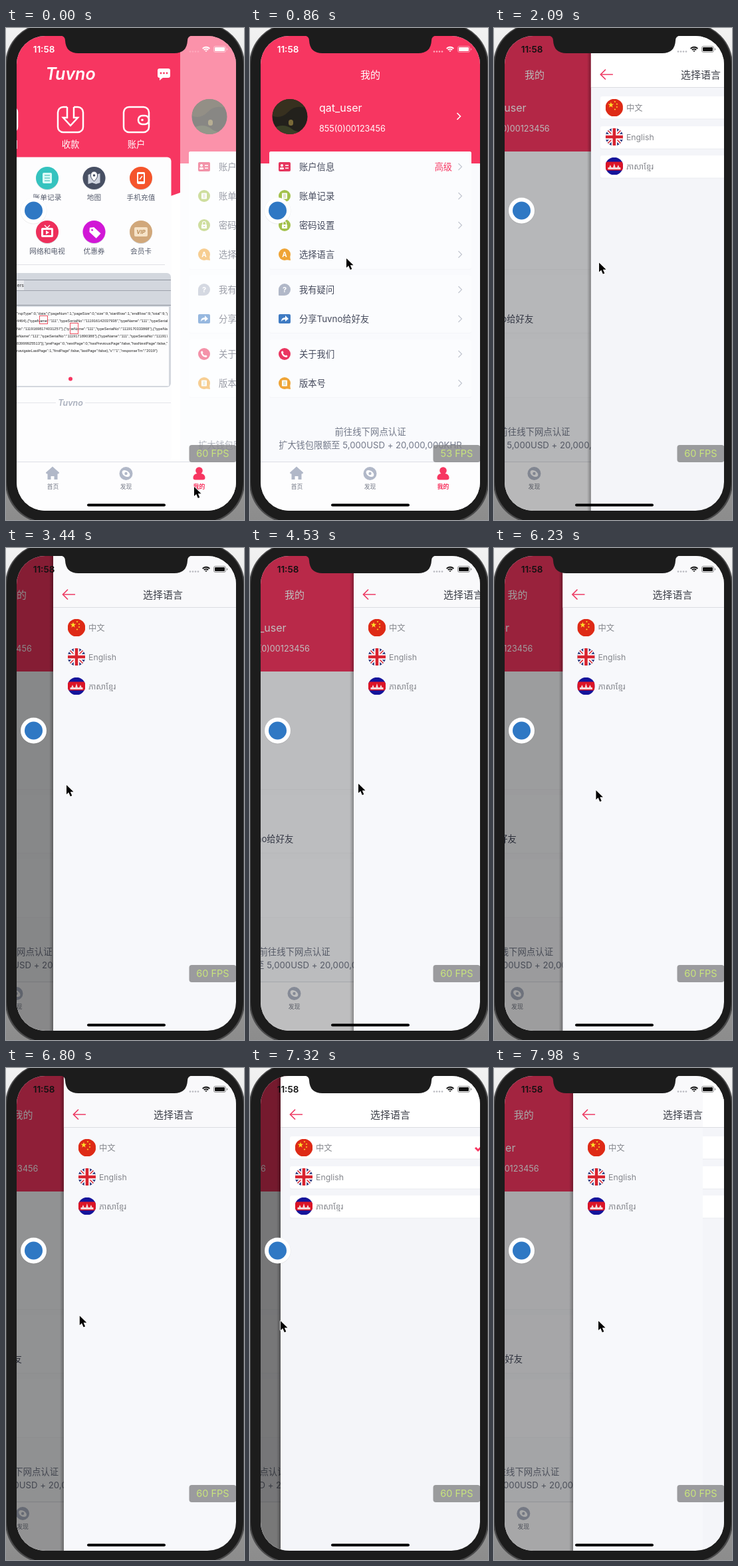
Animation, 358 px wide and 741 px high, one loop 8000 ms. Source, as an HTML page with a canvas:

```html
<!DOCTYPE html>
<html lang="zh-CN">
<head>
<meta charset="utf-8">
<title>Swipe back</title>
<style>
html, body { margin: 0; width: 100%; height: 100%; overflow: hidden; background: #d4d4d4; }
canvas { display: block; width: 358px; height: 741px; }
</style>
</head>
<body>
<canvas id="stage"></canvas>
<script>
const LOOP = 8000, W = 330, LEFT = 16, TOP = 12;
const RED = '#f73661', INK = '#454a5c', GREY = '#b1b8c8';
const FONT = 'Inter, "Noto Sans CJK SC", "Noto Sans CJK", "Noto Sans", sans-serif';
const cv = document.getElementById('stage');
const c = cv.getContext('2d');
const dpr = window.devicePixelRatio || 1;
cv.width = 358 * dpr;
cv.height = 741 * dpr;

// [time, value] pairs
const PAGE = [[1290, 330], [1540, 0], [1710, 0], [2080, 130], [2510, 40], [2900, 150], [3290, 34],
  [3350, 34], [3700, 170], [4180, 90], [4530, 140], [4770, 140], [5150, 50], [5600, 150],
  [5980, 30], [6520, 160], [6780, 70], [7030, 130], [7320, 30], [7400, 30], [8400, 147]];
const LEAD = [[1540, 9], [3440, 20], [4530, 7], [4770, 7], [6230, 50], [7320, 0], [7400, 0], [7980, 38]];
const CURSOR_X = [[90, 283], [530, 215], [710, 200], [860, 145], [1150, 118], [1300, 118], [1530, 25]];
const CURSOR_Y = [[90, 691], [530, 520], [710, 470], [860, 347], [1150, 341], [1300, 341], [1530, 352],
  [3440, 357], [4530, 355], [6230, 365], [7320, 381]];

const smooth = u => (1 - Math.cos(Math.PI * u)) / 2;
const easeOut = u => 1 - (1 - u) ** 3;
const clamp = u => Math.max(0, Math.min(1, u));

function track(keys, t, ease = u => u) {
  if (t <= keys[0][0]) return keys[0][1];
  for (let i = 1; i < keys.length; i++) {
    const [a, v] = keys[i - 1], [b, w] = keys[i];
    if (t <= b) return v + (w - v) * ease((t - a) / (b - a));
  }
  return keys[keys.length - 1][1];
}

function rect(x, y, w, h, fill, r = 0) {
  c.beginPath();
  c.roundRect(x, y, w, h, r);
  c.fillStyle = fill;
  c.fill();
}
function disc(x, y, r, fill) {
  c.beginPath();
  c.arc(x, y, r, 0, 7);
  c.fillStyle = fill;
  c.fill();
}
function line(points, color, width = 1) {
  c.beginPath();
  points.forEach(([x, y]) => c.lineTo(x, y));
  c.strokeStyle = color;
  c.lineWidth = width;
  c.stroke();
}
function poly(points, fill) {
  c.beginPath();
  points.forEach(([x, y]) => c.lineTo(x, y));
  c.fillStyle = fill;
  c.fill();
}
function shape(d, fill, stroke, width = 1) {
  const p = new Path2D(d);
  if (fill) { c.fillStyle = fill; c.fill(p); }
  if (stroke) { c.strokeStyle = stroke; c.lineWidth = width; c.stroke(p); }
}
function text(s, x, y, size, color, align = 'left', style = '', font = FONT) {
  c.font = `${style} ${size}px ${font}`;
  c.textAlign = align;
  c.fillStyle = color;
  c.fillText(s, x, y + size * .37);
}
function at(x, y, draw) {
  c.save();
  c.translate(x, y);
  draw();
  c.restore();
}
function clipTo(x, y, w, h, draw, r = 0) {
  c.save();
  c.beginPath();
  c.roundRect(x, y, w, h, r);
  c.clip();
  draw();
  c.restore();
}
const chevron = (x, y, color, width = 1.2, s = 5) =>
  line([[x - s / 2, y - s], [x + s / 2, y], [x - s / 2, y + s]], color, width);

function bubble(color) {
  disc(0, 0, 9, color);
  poly([[2, 8], [9, 9], [8, 2]], color);
}
function doc() {
  rect(-4, -4.5, 8, 9, '#fff', 1);
  for (const y of [-2, 0, 2]) line([[-2, y], [2, y]], '#a8b060', .7);
}
const ICONS = {
  card() {
    rect(-9, -7, 18, 14, '#e6375f', 2);
    disc(-4, -2, 2, '#fff');
    rect(-7, 1, 6, 3, '#fff', 1.5);
    line([[1, -2], [6, -2]], '#fff', 1.3);
    line([[1, 2], [6, 2]], '#fff', 1.3);
  },
  bill() { disc(0, 0, 9, '#a3c14b'); doc(); },
  lock() {
    disc(0, 0, 9, '#a3c14b');
    rect(-4, -1, 8, 6, '#fff', 1);
    shape('M-2.5-1V-3A2.5 2.5 0 0 1 2.5-3V-1', null, '#fff', 1.2);
    disc(0, 2, 1, '#a3c14b');
  },
  lang() { bubble('#efa436'); text('A', 0, 0, 10, '#fff', 'center', 'bold'); },
  help() {
    disc(0, 0, 9, GREY);
    rect(-9, 0, 9, 9, GREY, 1);
    text('?', 0, 0, 11, '#fff', 'center', 'bold');
  },
  share() {
    rect(-9, -7, 18, 14, '#3f7bc3', 2);
    shape('M-5 4Q-5-2 1-2V-5L6 0L1 4V1Q-3 1-5 4Z', '#fff');
  },
  phone() {
    disc(0, 0, 9, '#ea3560');
    shape('M-4-3Q-3 3 3 4', null, '#fff', 2.2);
    line([[-4, -4], [-2.5, -1.5]], '#fff', 2.6);
    line([[1.5, 2.5], [4, 4]], '#fff', 2.6);
  },
  version() { bubble('#efa436'); doc(); }
};
const ROWS = [['card', '账户信息', 209], ['bill', '账单记录', 253], ['lock', '密码设置', 297],
  ['lang', '选择语言', 341], ['help', '我有疑问', 394], ['share', '分享Tuvno给好友', 438],
  ['phone', '关于我们', 491], ['version', '版本号', 535]];

function avatar() {
  clipTo(33.5, 107, 53, 53, () => {
    rect(33, 107, 54, 54, '#23211c');
    shape('M33 107H87V122Q70 114 58 126T33 132Z', '#37301f');
    shape('M33 161V152Q50 142 63 152T87 149V161Z', '#3a3f26');
    rect(58, 138, 7, 9, '#7a6a38', 4);
  }, 27);
}

function mine() {
  rect(LEFT, TOP, W, 715, '#f9fafd');
  rect(LEFT, TOP, W, 192, RED);
  text('我的', 181, 70, 15, '#fff', 'center');
  avatar();
  text('qat_user', 104, 120, 16, '#fff');
  text('855(0)00123456', 104, 151, 12.6, '#fff');
  chevron(314, 133, '#fff', 1.6);
  for (const [y, h] of [[186, 177], [372, 87], [469, 87]]) {
    rect(29, y, 304, h + 1, '#f4f5f8', 3);
    rect(29, y, 304, h, '#fbfcfe', 3);
  }
  for (const [icon, label, y] of ROWS) {
    at(52, y, ICONS[icon]);
    text(label, 74, y, 13.3, INK);
    chevron(316, y, '#c3c7d0');
  }
  text('高级', 304, 209, 13.2, RED, 'right');
  text('前往线下网点认证', 181, 608, 13.4, '#737989', 'center');
  text('扩大钱包限额至 5,000USD + 20,000,000KHR', 181, 628, 13.2, '#737989', 'center');
}

function tabBar() {
  rect(LEFT, 654, W, 73, '#fdfdfe');
  line([[LEFT, 653.5], [346, 653.5]], '#dcdee5');
  shape('M70 660.5L80 669.5Q80 672 77.5 671.5V680H72.5V675H67.5V680H62.5V671.5Q60 672 60 669.5Z', GREY);
  disc(180.5, 671, 10, GREY);
  c.beginPath();
  c.ellipse(180.5, 671, 6.5, 4.3, .6, 0, 7);
  c.fillStyle = '#fff';
  c.fill();
  disc(180.5, 671, 2.2, GREY);
  disc(290.5, 666.5, 5.3, RED);
  rect(281.5, 671, 18, 9.5, RED, [8, 8, 4, 4]);
  [['首页', 70.5], ['发现', 180.5], ['我的', 290.5]].forEach(([s, x], i) =>
    text(s, x, 691, 8.9, i == 2 ? RED : '#777c89', 'center', i == 2 ? '600' : ''));
}

function bigIcon(x, label, draw) {
  c.beginPath();
  c.roundRect(x - 19, 119, 38, 38, 8);
  c.strokeStyle = '#fff';
  c.lineWidth = 2.5;
  c.stroke();
  at(x, 138, draw);
  text(label, x, 175, 13.3, '#fff', 'center');
}
const GRID = [
  ['账单记录', '#35c3bf', () => { rect(-7, -8, 14, 16, '#d9fbf7', 2); for (const y of [-4, 0, 4]) line([[-4, y], [4, y]], '#35b3b0'); }],
  ['地图', '#474f63', () => { poly([[-9, -5], [-3, -7], [3, -5], [9, -7], [9, 7], [3, 9], [-3, 7], [-9, 9]], '#cfd4df'); shape('M0 5Q-6-1-5-5A5 5 0 0 1 5-5Q6-1 0 5Z', '#fff', '#474f63'); disc(0, -4, 1.8, '#474f63'); }],
  ['手机充值', '#f5552c', () => { rect(-6, -9, 12, 18, '#fff', 2); rect(-4, -6, 8, 11, '#f5552c'); line([[-2, 2], [2, -3]], '#fff', 1.5); }],
  ['网络和电视', '#ee2f5b', () => { rect(-9, -6, 18, 14, '#fff', 2); rect(-6, -3, 12, 8, '#ee2f5b'); poly([[-2, -2], [3, 1], [-2, 4]], '#fff'); line([[-4, -10], [0, -6], [4, -10]], '#fff', 1.3); }],
  ['优惠券', '#d117d6', () => { c.rotate(.75); poly([[-9, 0], [-5, -5], [9, -5], [9, 5], [-5, 5]], '#fff'); disc(-4, 0, 1.5, '#d117d6'); }],
  ['会员卡', '#d1a87b', () => { rect(-10, -7, 20, 14, '#f6e3c8', 2); text('VIP', 0, 0, 8, '#b88a55', 'center', 'bold italic'); }]
];
const LOG = ['"rspType":0,"data":{"pageNum":1,"pageSize":0,"size":9,"startRow":1,"endRow":9,"total":9,"pages":1,',
  '4464},{"typeName":"111","typeSerialNo":"111916142037938","typeName":"111","typeSerialNo":"1119',
  'No":"11191698174031257"},{"typeName":"111","typeSerialNo":"1119170333868"},{"typeName":"11',
  'eName":"111","typeSerialNo":"1119171890388"},{"typeName":"111","typeSerialNo":"111917192',
  '83999925513"}],"prePage":0,"nextPage":0,"hasPreviousPage":false,"hasNextPage":false,"navig',
  'navigateLastPage":1,"firstPage":false,"lastPage":false},"v":"1","responseTm":"2019"}'];

function home() {
  rect(LEFT, TOP, W, 715, '#fff');
  shape('M16 12H346V248Q181 310 16 248Z', RED);
  text('Tuvno', 181, 69, 25, '#fff', 'center', 'italic 600');
  rect(312, 61, 19, 14, '#fff', 3);
  poly([[315, 73], [315, 79], [321, 74]], '#fff');
  for (const x of [317, 321.5, 326]) disc(x, 68, 1.4, RED);
  bigIcon(82, '扫一扫', () => line([[-10, 0], [10, 0]], '#fff', 2.5));
  bigIcon(181, '收款', () => {
    rect(-5, -21, 10, 5, RED);
    line([[-5, -19], [-5, -3], [-11, -3], [0, 9], [11, -3], [5, -3], [5, -19]], '#fff', 2.5);
  });
  bigIcon(280, '账户', () => {
    c.beginPath();
    c.roundRect(3, -6, 16, 13, 6);
    c.strokeStyle = '#fff';
    c.lineWidth = 2.5;
    c.stroke();
    disc(9, .5, 1.8, '#fff');
  });
  rect(29, 194.5, 303.5, 459, '#fdfdfe', 6);
  GRID.forEach(([label, color, draw], i) => {
    const x = 146 + i % 3 * 70.5, y = i < 3 ? 226 : 307;
    disc(x, y + 1, 17, '#d5d9df');
    disc(x, y, 17, color);
    at(x, y, draw);
    text(label, x, y + 29.5, 10.7, '#555b6c', 'center');
  });
  line([[39, 356.5], [323, 356.5]], '#dfe0e5');
  clipTo(29, 369, 303, 172, () => {
    rect(29, 369, 303, 172, '#d3d7de');
    line([[29, 379.5], [332, 379.5]], '#8d929c');
    rect(29, 380, 82, 15, '#e7e9ed');
    text('Headers', 111, 387, 7, '#333', 'right');
    line([[29, 395.5], [332, 395.5]], '#9da2ab');
    line([[29, 417.5], [332, 417.5]], '#8d929c');
    rect(29, 420, 300, 119, '#fdfdfe');
    clipTo(29, 420, 298, 119, () => LOG.forEach((s, i) =>
      text(s, 100, 430 + i * 11.2, 5.7, '#222', 'left', '', '"Liberation Sans", sans-serif')));
    c.strokeStyle = '#ee5262';
    c.lineWidth = 1;
    c.strokeRect(134.5, 433.5, 12, 12);
    c.strokeRect(180.5, 444.5, 12, 16);
  }, 6);
  disc(181, 528.5, 3, RED);
  line([[39, 564.5], [159, 564.5]], '#e3e5ea');
  line([[203, 564.5], [332, 564.5]], '#e3e5ea');
  text('Tuvno', 181, 564, 12.5, '#a9afbd', 'center', 'italic 600');
}

function star(x, y, r) {
  const pts = [];
  for (let i = 0; i < 10; i++) {
    const a = i * Math.PI / 5 - Math.PI / 2, q = i % 2 ? r * .4 : r;
    pts.push([x + q * Math.cos(a), y + q * Math.sin(a)]);
  }
  poly(pts, '#ffdf2b');
}
const FLAGS = [
  () => {
    rect(-13, -13, 26, 26, '#de2a16');
    star(-5, -4, 4.5);
    for (const [x, y] of [[1, -9], [4, -5.5], [4, -1], [1, 2.5]]) star(x, y, 1.6);
  },
  () => {
    rect(-13, -13, 26, 26, '#1f2f78');
    for (const s of [1, -1]) {
      line([[-13, -13 * s], [13, 13 * s]], '#fff', 5);
      line([[-13, -13 * s], [13, 13 * s]], '#d8232f', 1.6);
    }
    for (const [color, w] of [['#fff', 8.5], ['#d8232f', 4.6]]) {
      line([[-13, 0], [13, 0]], color, w);
      line([[0, -13], [0, 13]], color, w);
    }
  },
  () => {
    rect(-13, -13, 26, 26, '#14149b');
    rect(-13, -6.5, 26, 13, '#dc1426');
    rect(-9.5, 2, 19, 3, '#f5d9d9');
    for (const [x, h] of [[-6, 4], [0, 6], [6, 4]]) poly([[x - 2, 2.5], [x, 2 - h], [x + 2, 2.5]], '#f5d9d9');
  }
];
const NAMES = ['中文', 'English', 'ភាសាខ្មែរ'];

function langBack(fresh) {
  rect(LEFT, TOP, W, 715, fresh ? '#f4f5f9' : '#f7f8fb');
  rect(LEFT, TOP, W, 77, fresh ? '#fff' : '#f9f9fb');
  if (fresh) for (const y of [103, 148, 192]) {
    rect(30, y + 1, 302, 34, '#eeeff3', 3);
    rect(30, y, 302, 33.5, '#fff', 3);
  }
}

function language(o, t) {
  const fresh = t < 2520 || t > 7000;
  langBack(fresh && t <= 7420);
  if (t > 7420) clipTo(314 - o, TOP, W, 715, () => langBack(true));
  line([[LEFT, 89.5], [346, 89.5]], '#dcdde1');
  line([[49, 70], [31, 70]], '#ee3a63', 1.7);
  line([[38, 62.5], [30.5, 70], [38, 77.5]], '#ee3a63', 1.7);
  text('选择语言', 181, 70, 15, '#3c3f48', 'center');
  FLAGS.forEach((flag, i) => {
    const y = 120 + i * 44;
    at(51, y, () => clipTo(-13.3, -13.3, 26.6, 26.6, flag, 13.3));
    text(NAMES[i], 69, y, 12.3, '#85878d');
  });
  line([[309, 120], [313, 124], [320, 117]], RED, 3);
}

function status(color) {
  text('11:58', 57, 32, 13.5, color, 'center', '600');
  for (let i = 0; i < 4; i++) disc(277 + i * 4, 35.5, 1.3, color == '#fff' ? '#ffa9bd' : '#b9bac0');
  for (const r of [2, 5, 8]) {
    c.beginPath();
    c.arc(301, 36, r - .8, -Math.PI * .76, -Math.PI * .24);
    c.strokeStyle = color;
    c.lineWidth = 2;
    c.stroke();
  }
  c.globalAlpha = .45;
  c.beginPath();
  c.roundRect(312.5, 27.5, 18, 9, 2.5);
  c.strokeStyle = color;
  c.lineWidth = 1;
  c.stroke();
  rect(332, 30.5, 1.3, 3, color, 1);
  c.globalAlpha = 1;
  rect(314, 29, 15, 6, color, 1.2);
}

function screen(t) {
  const o = track(PAGE, t, t < 1540 ? easeOut : smooth);
  if (t < 530) {
    const p = easeOut(clamp((t - 90) / 440));
    const x = 246 * (1 - p);
    at(x - W, 0, home);
    at(x, 0, () => {
      mine();
      rect(LEFT, TOP, W, 715, `rgba(255,255,255,${.46 * (1 - p)})`);
    });
    tabBar();
  } else {
    at(-.6 * (W - o), 0, () => { mine(); tabBar(); });
    if (o < W) {
      const edge = LEFT + o;
      rect(LEFT, TOP, W, 715, `rgba(0,0,0,${Math.max(0, .6 - .0025 * o)})`);
      const g = c.createLinearGradient(edge - 6, 0, edge, 0);
      g.addColorStop(0, 'rgba(0,0,0,0)');
      g.addColorStop(1, 'rgba(0,0,0,.3)');
      rect(edge - 6, TOP, 6, 715, g);
      at(o, 0, () => language(o, t));
    }
  }
  status(t < 1400 ? '#fff' : '#111');
  disc(41.5, 275.5, 20, 'rgba(0,0,0,.06)');
  disc(41.5, 275, 19.5, '#fff');
  disc(41.5, 275, 13.5, '#2f78c4');
  rect(275.5, 628, 71, 26, 'rgba(130,130,133,.78)', 4);
  text(`${t > 720 && t < 1530 ? 53 : 60} FPS`, 311, 641, 14.5, '#c9e57c', 'center');
  rect(122, 716.5, 118, 4, '#000', 2);
}

function bezel() {
  const g = c.createLinearGradient(0, 0, 0, 741);
  g.addColorStop(0, '#f2f2f2');
  g.addColorStop(1, '#8c8c8c');
  rect(0, 0, 358, 741, g);
  rect(-1, -7, 360, 753, '#4a4a4b', 62);
  rect(1, -6, 356, 750, '#1c1c1c', 61);
}

function cursor(t, o) {
  const x = t < 1540 ? track(CURSOR_X, t) : LEFT + o + track(LEAD, t);
  const arrow = 'M0 0V14L3.2 11L5.8 17L8.3 16L5.8 10.2H10.5Z';
  at(x, track(CURSOR_Y, t), () => {
    c.lineJoin = 'round';
    shape(arrow, '#000', '#fff', 1.6);
    shape(arrow, '#000');
  });
}

function frame(now) {
  const t = now % LOOP;
  c.setTransform(dpr, 0, 0, dpr, 0, 0);
  bezel();
  clipTo(LEFT, TOP, W, 715, () => screen(t), 43);
  shape('M81 11Q89 12 89 19Q90 38 109 38H253Q272 38 273 19Q273 12 281 11Z', '#1c1c1c');
  cursor(t, track(PAGE, t, smooth));
}

let start;
function tick(now) {
  start ??= now;
  frame(now - start);
  requestAnimationFrame(tick);
}
frame(0);
requestAnimationFrame(tick);
</script>
</body>
</html>
```
